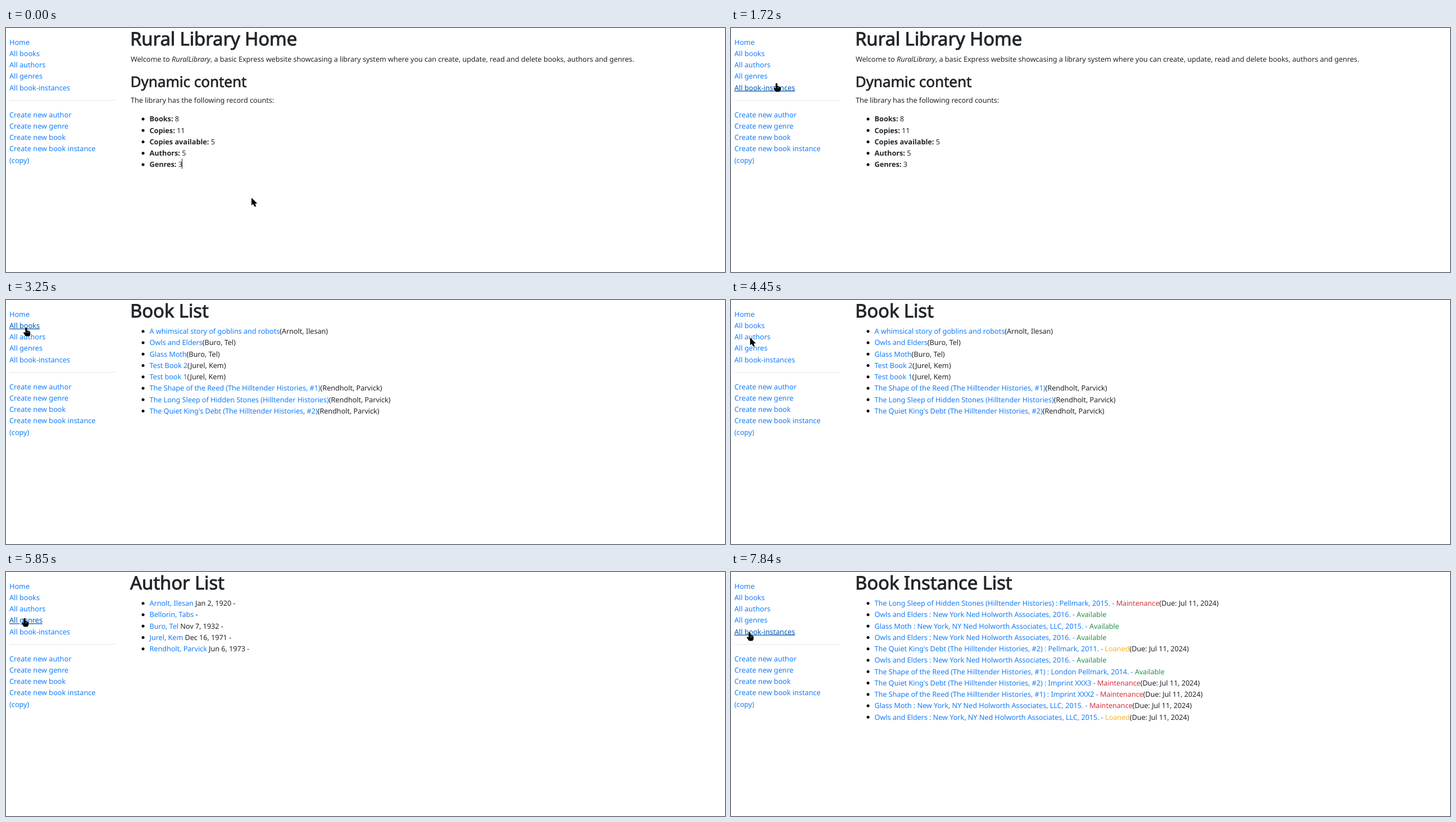
Recreate the animation shown at these times as an HTML page. Size 1280x434 px, loop 8 s.

```html
<!DOCTYPE html>
<html lang="en">
<head>
<meta charset="utf-8">
<title>Library</title>
<style>
  html, body { margin: 0; width: 100%; height: 100%; overflow: hidden; background: #fff; }
  svg { display: block; width: 1280px; height: 434px; }
  text {
    font: 12.7px "Noto Sans", "Open Sans", sans-serif;
    fill: #212529; white-space: pre;
    text-rendering: geometricPrecision;
  }
  .body { letter-spacing: -.06px; }
  .h1, .h2 { stroke: #212529; letter-spacing: -.1px; }
  .h1 { font-size: 32.9px; stroke-width: .9px; }
  .h2 { font-size: 26.2px; stroke-width: .7px; }
  .bold { font-weight: 700; letter-spacing: 0; }
  .em { font-style: italic; }
  .link { fill: #147cf9; }
  .link.hover { fill: #0056b3; text-decoration: underline; text-decoration-thickness: 1px; }
  .Available { fill: #28914a; }
  .Maintenance { fill: #d2323f; }
  .Loaned { fill: #f5b32f; }
</style>
</head>
<body>
<svg viewBox="0 0 1280 434">
  <path d="M6 128.500H195.500" stroke="#e6e6e6"/>
  <g id="nav"></g>
  <g id="pages"></g>
  <path id="caret" d="M313.500 232.500V250.500" stroke="#212529"/>
  <g id="pointer">
    <circle id="click" cy="1.500" r="10" fill="#ff0" fill-opacity=".47"/>
    <path id="arrow" d="M0 0V13.600L3 11L5.200 15.400H8.200L6.600 10.600L10.200 10Z"/>
    <g id="hand">
      <path d="M-1.600 1.200Q0-1 1.600 1.200V5L6 6.400Q7.200 7 7.200 9V12Q6.600 14.500 5 15.600H-1L-5 9.600Q-4.600 7.500-2.800 8.400L-1.600 9.400Z"/>
      <path d="M1 8.300H5" stroke="#fff" stroke-width=".8" opacity=".7"/>
    </g>
  </g>
</svg>
<script>
const LOOP = 8000, ROW = 20.25, STEP = 63, BLINK = 530, PRESS = 140, WAIT = 200;
const $ = id => document.getElementById(id);

function add(parent, tag, attrs, content = "") {
  const el = document.createElementNS("http://www.w3.org/2000/svg", tag);
  for (const key in attrs) el.setAttribute(key, attrs[key]);
  el.textContent = content;
  return parent.appendChild(el);
}

// A line is a list of runs: [text, class]
function line(parent, x, y, runs, cls = "body") {
  const el = add(parent, "text", { x, y, class: cls });
  for (const [str, style = ""] of runs) add(el, "tspan", { class: style }, str);
}

function list(parent, y, rows) {
  rows.forEach((runs, i) => {
    const base = y + i * ROW;
    add(parent, "circle", { cx: 244, cy: base - 4.2, r: 2.5 });
    line(parent, 255.5, base, runs);
  });
}

function page(title, rows = []) {
  const g = add($("pages"), "g", {});
  line(g, 221, 31, [[title]], "h1");
  list(g, 60, rows);
  return g;
}

const menu = (y, names) => names.map((name, i) =>
  add($("nav"), "text", { x: 6, y: y + i * ROW, class: "link" }, name));
const links = menu(29.6, ["Home", "All books", "All authors", "All genres", "All book-instances"]);
menu(158.5, ["Create new author", "Create new genre", "Create new book", "Create new book instance", "(copy)"]);

const people = {
  arnolt: "Arnolt, Ilesan", bell: "Bellorin, Tabs", buro: "Buro, Tel",
  jurel: "Jurel, Kem", rend: "Rendholt, Parvick"
};
const books = {
  tale: "A whimsical story of goblins and robots",
  owls: "Owls and Elders",
  moth: "Glass Moth",
  reed: "The Shape of the Reed (The Hilltender Histories, #1)",
  stones: "The Long Sleep of Hidden Stones (Hilltender Histories)",
  debt: "The Quiet King's Debt (The Hilltender Histories, #2)"
};
const press = "Ned Holworth Associates";
const owlsPrint = `New York ${press}, 2016.`;
const latePrint = `New York, NY ${press}, LLC, 2015.`;

const bookRow = (title, author) => [[title, "link"], [`(${author})`]];
const authorRow = (name, born) => [[name, "link"], [` ${born}- `]];
const copyRow = (title, imprint, status) => [
  [`${title} : ${imprint} - `, "link"], [status, status],
  [status === "Available" ? "" : "(Due: Jul 11, 2024)"]
];

const home = page("Rural Library Home");
line(home, 222, 60, [["Welcome to "], ["RuralLibrary", "em"],
  [", a basic Express website showcasing a library system where you can create, update, read and delete books, authors and genres."]]);
line(home, 221.5, 105, [["Dynamic content"]], "h2");
line(home, 222, 132.6, [["The library has the following record counts:"]]);
list(home, 166.3, ["Books: 8", "Copies: 11", "Copies available: 5", "Authors: 5", "Genres: 3"]
  .map(str => str.split(/(?= \d)/)).map(([name, count]) => [[name, "bold"], [count]]));

const bookList = page("Book List", [
  bookRow(books.tale, people.arnolt),
  bookRow(books.owls, people.buro),
  bookRow(books.moth, people.buro),
  bookRow("Test Book 2", people.jurel),
  bookRow("Test book 1", people.jurel),
  bookRow(books.reed, people.rend),
  bookRow(books.stones, people.rend),
  bookRow(books.debt, people.rend)
]);
const authorList = page("Author List", [
  authorRow(people.arnolt, "Jan 2, 1920 "),
  authorRow(people.bell, ""),
  authorRow(people.buro, "Nov 7, 1932 "),
  authorRow(people.jurel, "Dec 16, 1971 "),
  authorRow(people.rend, "Jun 6, 1973 ")
]);
const genreList = page("Genre List",
  ["Fantasy", "French Poetry", "Science Fiction"].map(name => [[name, "link"]]));
const copyList = page("Book Instance List", [
  copyRow(books.stones, "Pellmark, 2015.", "Maintenance"),
  copyRow(books.owls, owlsPrint, "Available"),
  copyRow(books.moth, latePrint, "Available"),
  copyRow(books.owls, owlsPrint, "Available"),
  copyRow(books.debt, "Pellmark, 2011.", "Loaned"),
  copyRow(books.owls, owlsPrint, "Available"),
  copyRow(books.reed, "London Pellmark, 2014.", "Available"),
  copyRow(books.debt, "Imprint XXX3", "Maintenance"),
  copyRow(books.reed, "Imprint XXX2", "Maintenance"),
  copyRow(books.moth, latePrint, "Maintenance"),
  copyRow(books.owls, latePrint, "Loaned")
]);

// Each click opens a page a little later
const visits = [
  { click: 2200, open: 2790, view: bookList },
  { click: 4050, open: 4650, view: authorList },
  { click: 5710, open: 6390, view: genreList },
  { click: 7180, open: 7840, view: copyList }
];
const rest = { x: 437, y: 302 };
const moves = [
  { start: 1060, end: 1720, x: 81, y: 98 },
  { start: 1790, end: 2050, x: 36, y: 47 },
  { start: 3190, end: 3450, x: 34, y: 67 },
  { start: 5310, end: 5450, x: 33, y: 82 },
  { start: 6720, end: 7040, x: 33, y: 107 }
];

const ease = p => p * p * (3 - 2 * p);
const show = (el, on) => { el.style.display = on ? "" : "none"; };

// The pointer eases to each stop, redrawn once per STEP
function pointerAt(t) {
  let { x, y } = rest;
  for (const m of moves.filter(m => t >= m.start)) {
    const count = Math.floor((m.end - m.start) / STEP) + 1;
    const done = Math.floor((t - m.start) / STEP) + 1;
    const p = ease(Math.min(1, done / count));
    x += (m.x - x) * p;
    y += (m.y - y) * p;
  }
  return { x: Math.round(x), y: Math.round(y) };
}

function render(t) {
  const { view } = visits.filter(v => t >= v.open).pop() || { view: home };
  for (const g of $("pages").children) show(g, g === view);

  const { x, y } = pointerAt(t);
  const busy = visits.some(v => t >= v.open - WAIT && t < v.open);
  let over = false;
  links.forEach((link, i) => {
    const hit = !busy && Math.abs(y - 24.9 - i * ROW) < 9.2 && x < 6 + link.getComputedTextLength();
    link.classList.toggle("hover", hit);
    over = over || hit;
  });

  $("pointer").setAttribute("transform", `translate(${x} ${y})`);
  show($("hand"), over);
  show($("arrow"), !over);
  show($("click"), visits.some(v => t >= v.click && t < v.click + PRESS));
  show($("caret"), t < visits[0].click && Math.floor(t / BLINK) % 2 === 0);
}

function tick() {
  render(performance.now() % LOOP);
  requestAnimationFrame(tick);
}
tick();
</script>
</body>
</html>
```
